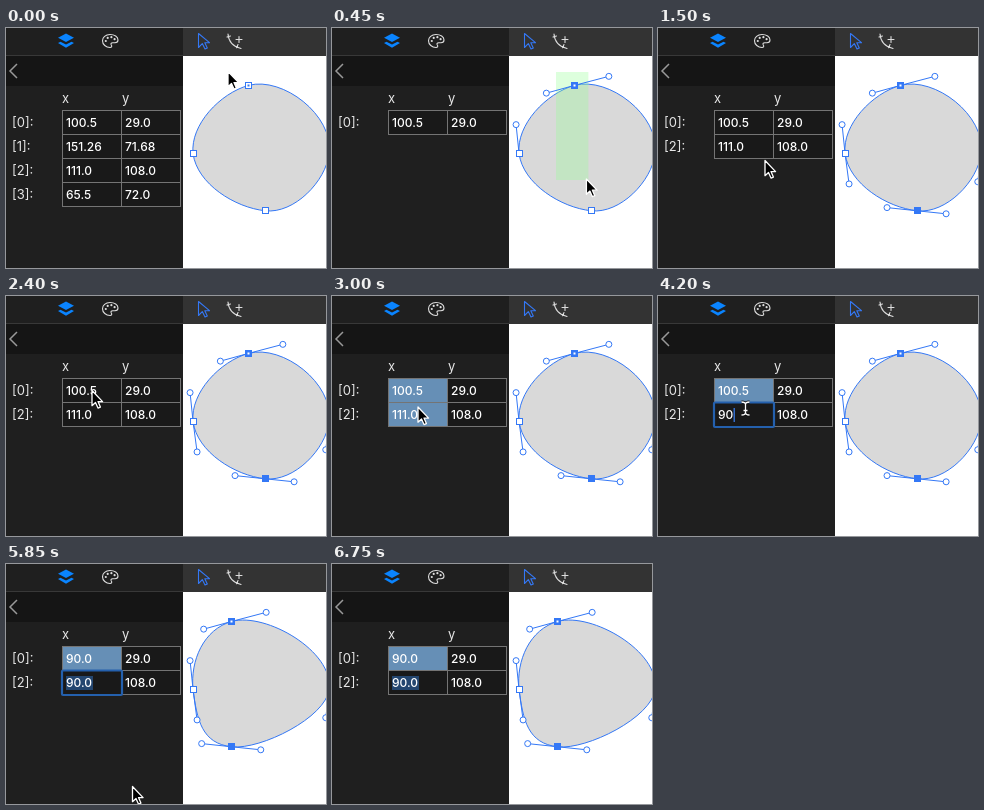
An HTML page for the animation above (6.77 s loop, 320 by 240 pixels).

```html
<!DOCTYPE html>
<html lang="en">
<head>
<meta charset="utf-8">
<title>Point coordinates editor</title>
<style>
  html, body { margin: 0; width: 100%; height: 100%; overflow: hidden; background: #1f1f1f; }
  svg { display: block; width: 100vw; height: 100vh; }
  text { font-family: Inter, Roboto, sans-serif; font-weight: 500; fill: #fff; }
  .label { font-size: 13px; font-weight: 400; fill: #e6e6e6; }
  .value { font-size: 12px; }
  .wire { fill: none; stroke: #3478f6; }
  .knob { fill: #fff; stroke: #3478f6; }
  .icon { fill: none; stroke: #ddd; stroke-width: 1.1; stroke-linecap: round; stroke-linejoin: round; }
</style>
</head>
<body>
<svg viewBox="0 0 320 240">
  <defs>
    <clipPath id="page"><rect x="177" y="28" width="143" height="212"/></clipPath>
    <path id="arrow" d="M0 0V15.2L3.5 12 6 17.6 8.4 16.6 6 11.1H10.6Z"
      fill="#000" stroke="#fff" stroke-width="1.3" stroke-linejoin="round"/>
    <path id="beam" d="M-4-6.5Q0-6.5 0-4Q0-6.5 4-6.5M0-4V4M-4 6.5Q0 6.5 0 4Q0 6.5 4 6.5M-2 2H2"/>
  </defs>

  <rect width="320" height="240" fill="#1f1f1f"/>
  <rect y="28" width="177" height="30" fill="#151515"/>
  <path d="M0 27.5H177" stroke="#383838"/>
  <rect x="177" width="143" height="28" fill="#333"/>
  <rect x="177" y="28" width="143" height="212" fill="#fff"/>

  <g fill="#0a84ff">
    <path d="M60 5.5L68 9.8 60 14 52 9.8Z"/>
    <path d="M52 15L54.5 13.7 60 16.6 65.5 13.7 68 15 60 19.8Z"/>
  </g>
  <path class="icon" d="M104 6.5C99.500 6.500 96.500 9.300 96.500 12.700C96.500 16.500 100 19.500 104 19.500C106 19.500 106 18 105.300 17C104.500 15.700 105.200 14.700 106.700 14.700H109C111 14.700 112 13.500 112 12C112 8.800 108.500 6.500 104 6.500Z"/>
  <path d="M99.800 13h0M101.700 9.900h0M105.400 9.200h0M108.600 11.200h0"
    stroke="#ddd" stroke-width="2.2" stroke-linecap="round"/>
  <path d="M192.5 5.5V19.5L196.300 15.600 199 21 201.300 19.900 198.800 14.700H203.500Z"
    fill="none" stroke="#3478f6" stroke-width="1.1" stroke-linejoin="round"/>
  <path class="icon" d="M222 6C222.500 13 227 18.500 235 20.500M233 8.500V14.500M230 11.500H236M221 9L224.500 8M230.500 19.800L232 16.500"/>
  <path d="M11 36L4 43 11 50" fill="none" stroke="#999" stroke-width="1.5"/>
  <text class="label" x="56" y="75">x</text>
  <text class="label" x="116" y="75">y</text>

  <g id="scene"></g>
</svg>
<script>
const LOOP = 6770, STEP = 150;
const BLUE = '#3478f6';
const scene = document.getElementById('scene');

// Pointer moves: begin, end, then where it arrives
const home = { x: 222, y: 43.5 };
const moves = [
  [0, 750, 272, 209.5],
  [1050, 1500, 107, 132.5],
  [1500, 1950, 102.5, 106],
  [1950, 2400, 86, 94.5],
  [2700, 3000, 86, 111],
  [5850, 5850, 126.5, 222.5]
];
const anchor = { x: 224, y: 44 };

// x, y, then offsets of the incoming and outgoing handles
const nodes = [
  [100.5, 29, [-28.3, 7.8], [34.2, -9]],
  [151.26, 71.68, [4.2, -38], [-3.5, 28.6]],
  [111, 108, [28.8, 3], [-30.3, -3.2]],
  [65.5, 72, [4, 30.3], [-3, -29]]
];

const toStage = (x, y) => [83.05 + x * 1.588, 11.3 + y * 1.588];
const ease = u => u * u * (3 - 2 * u);
const shift = ([x, y], [dx, dy]) => [x + dx, y + dy];
const rect = (x, y, w, h, attrs) => `<rect x="${x}" y="${y}" width="${w}" height="${h}" ${attrs}/>`;
const text = (cls, x, y, s) => `<text class="${cls}" x="${x}" y="${y}">${s}</text>`;

function pointerAt(t) {
  let { x, y } = home;
  for (const [from, to, ex, ey] of moves) {
    if (t < from) break;
    const k = t >= to ? 1 : ease((t - from) / (to - from));
    x += (ex - x) * k;
    y += (ey - y) * k;
  }
  return { x, y };
}

function stateAt(t) {
  const { x, y } = pointerAt(t);
  const corner = { x: x + 2, y: y + 1 };
  const data = nodes.map(([nx, ny], i) => [t >= 4800 && i % 2 === 0 ? 90 : nx, ny]);
  const drag = t >= 150 && t < 1050 ? corner : null;
  const inside = i => {
    const [px, py] = toStage(...data[i]);
    return drag && px <= corner.x && py <= corner.y;
  };
  const picked = [0, 2].filter(i => t >= 1050 || inside(i));
  return { t, x, y, data, drag, picked };
}

function shape({ data, drag, picked }) {
  const pos = data.map(p => toStage(...p));
  const arm = (i, k) => shift(pos[i], nodes[i][k]);
  let d = 'M' + pos[0], arms = '', marks = '';
  pos.forEach((p, i) => {
    const next = (i + 1) % 4;
    const on = picked.includes(i);
    d += `C${arm(i, 3)} ${arm(next, 2)} ${pos[next]}`;
    // A handle shows when either end of its segment is picked
    [[2, (i + 3) % 4], [3, next]].forEach(([k, other]) => {
      if (!on && !picked.includes(other)) return;
      const [hx, hy] = arm(i, k);
      arms += `<path class="wire" d="M${p}L${hx} ${hy}"/><circle class="knob" cx="${hx}" cy="${hy}" r="3"/>`;
    });
    const [nx, ny] = p.map(v => Math.round(v - 0.5) + 0.5);
    marks += rect(nx - 3, ny - 3, 6, 6, `fill="${on ? BLUE : '#fff'}" stroke="${BLUE}"`);
    if (i === 0) marks += rect(nx - 1, ny - 1, 2, 2, `fill="${on ? '#fff' : BLUE}"`);
  });
  const box = drag
    ? rect(anchor.x, anchor.y, drag.x - anchor.x, drag.y - anchor.y, 'fill="#90ff90" fill-opacity=".3"')
    : '';
  return `<g clip-path="url(#page)"><path class="wire" d="${d}Z" style="fill:#d9d9d9"/>${box}${arms}${marks}</g>`;
}

function table({ t, data, picked }) {
  const rows = picked.length ? picked : [0, 1, 2, 3];
  const editing = t >= 3150;
  const typing = t >= 4050 && t < 4800;
  let out = '';
  rows.forEach((id, r) => {
    const y = 82.5 + r * 24;
    out += text('label', 6, y + 16.5, `[${id}]:`);
    data[id].forEach((v, c) => {
      const x = 56.5 + c * 59;
      const lit = c === 0 && (r === 0 ? t >= 2700 : t >= 3000 && !editing);
      const active = editing && r === 1 && c === 0;
      let s = Number.isInteger(v * 10) ? v.toFixed(1) : v.toFixed(2);
      if (active && typing) s = '90'.slice(0, t < 4200 ? 1 : 2);
      out += rect(x, y, 59, 24, `fill="${lit ? '#668fb6' : '#191919'}" stroke="#747474"`);
      if (active && typing) out += rect(60 + s.length * 7.8, y + 5.5, 1.2, 14, 'fill="#3b82f6"');
      else if (active && t >= 3300) out += rect(60, y + 5.5, 27, 14, 'fill="#24466f"');
      out += text('value', x + 3.5, y + 16.7, s);
    });
  });
  if (editing && t < 6750)
    out += rect(56, 106.5, 60, 24.5, 'rx="1" fill="none" stroke="#2460ad" stroke-width="2.2"');
  return out;
}

function pointer({ t, x, y }) {
  if (t >= 6000) return '';
  if (t < 3150 || t >= 5850) return `<use href="#arrow" x="${x}" y="${y}"/>`;
  const beam = (color, w) =>
    `<use href="#beam" x="87.5" y="112.5" fill="none" stroke="${color}" stroke-width="${w}"/>`;
  return beam('#111', 3) + beam('#fff', 1.3);
}

const t0 = performance.now();
let last = -1;
function draw() {
  const t = (performance.now() - t0) % LOOP;
  const step = Math.floor(t / STEP) * STEP;
  if (step !== last) {
    last = step;
    const s = stateAt(step);
    scene.innerHTML = shape(s) + table(s) + pointer(s);
  }
  requestAnimationFrame(draw);
}
draw();
</script>
</body>
</html>
```
